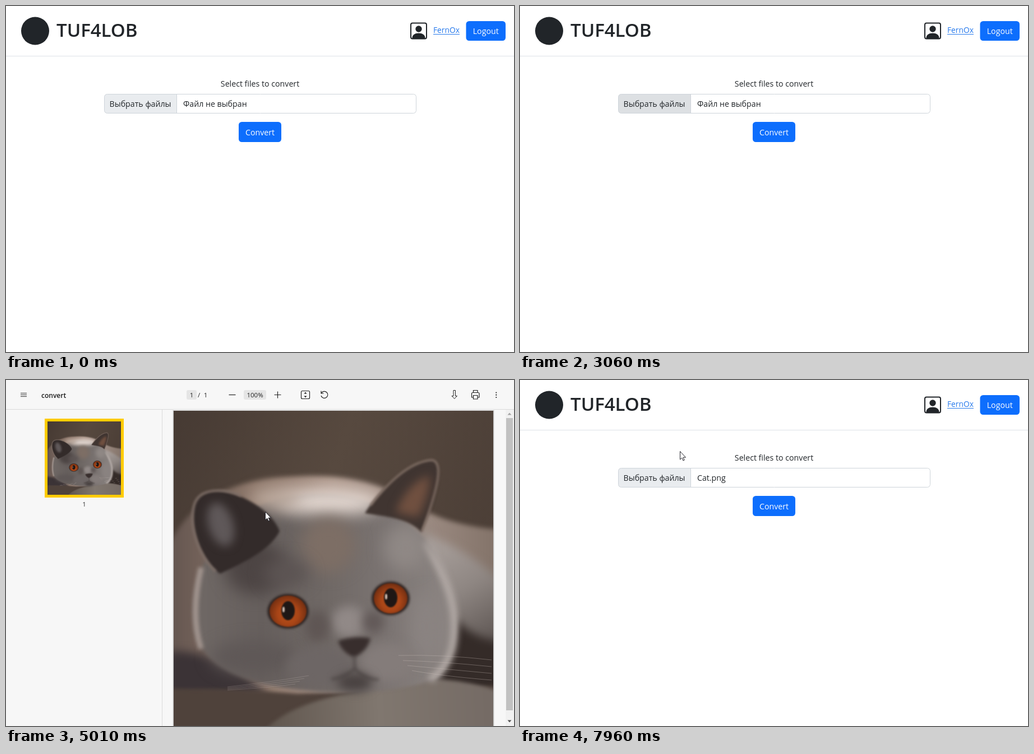
An HTML page with a canvas for the animation above (8000 ms loop, 906 px wide and 618 px high).

```html
<!DOCTYPE html>
<html lang="en">
<head>
<meta charset="utf-8">
<title>File converter</title>
<style>
html, body { margin: 0; width: 100%; height: 100%; overflow: hidden; background: #fff; }
canvas { display: block; width: 906px; height: 618px; }
</style>
</head>
<body>
<canvas id="stage" width="906" height="618"></canvas>
<script>
const LOOP = 8000, W = 906, H = 618;
const FONT = '"Open Sans", "Noto Sans", sans-serif';
const INK = '#212529', BLUE = '#0d6efd', BLUE_HOVER = '#0b5ed7';
const FIELD = { x: 175, y: 157, w: 557, h: 35 };
const CONVERT = { x: 415, y: 207, w: 76, h: 36 };
const PHOTO = { x: 299, y: 55, size: 570 };

// start, end, steps, from, to
const MOVES = [
  [250, 1010, 11, [452, 420], [402, 178]],
  [3130, 3820, 10, [520, 322], [478, 262]],
  [3890, 4290, 6, [478, 262], [463, 236]],
  [5010, 5010, 1, [462, 235], [462, 235]],
  [6080, 6400, 5, [462, 235], [71, 0]],
  [7890, 7960, 2, [71, 0], [285, 127]]
];

const stage = document.getElementById('stage');
let ctx = stage.getContext('2d');

const clamp = v => Math.max(0, Math.min(1, v));

function mix(a, b, p) {
  return 'rgb(' + a.map((v, i) => Math.round(v + (b[i] - v) * p)).join(',') + ')';
}

function text(str, x, y, size, color = INK, align = 'left', weight = 400) {
  ctx.font = `${weight} ${size}px ${FONT}`;
  ctx.textAlign = align;
  ctx.fillStyle = color;
  ctx.fillText(str, x, y);
}

function rect(x, y, w, h, color) {
  ctx.fillStyle = color;
  ctx.fillRect(x, y, w, h);
}

function roundBox(x, y, w, h, r, fill, stroke, width = 1) {
  ctx.beginPath();
  ctx.roundRect(x, y, w, h, r);
  if (fill) { ctx.fillStyle = fill; ctx.fill(); }
  if (stroke) { ctx.strokeStyle = stroke; ctx.lineWidth = width; ctx.stroke(); }
}

function ellipse(x, y, rx, ry, fill, turn = 0) {
  ctx.beginPath();
  ctx.ellipse(x, y, rx, ry, turn, 0, 7);
  ctx.fillStyle = fill;
  ctx.fill();
}

function shape(d, fill) {
  ctx.fillStyle = fill;
  ctx.fill(new Path2D(d));
}

function line(d, color = '#222', width = 1.2) {
  ctx.strokeStyle = color;
  ctx.lineWidth = width;
  ctx.stroke(new Path2D(d));
}

function radial(x, y, r, ...colors) {
  const g = ctx.createRadialGradient(x, y, 0, x, y, r);
  colors.forEach((c, i) => g.addColorStop(i / (colors.length - 1), c));
  return g;
}

function linear(x0, y0, x1, y1, ...colors) {
  const g = ctx.createLinearGradient(x0, y0, x1, y1);
  colors.forEach((c, i) => g.addColorStop(i / (colors.length - 1), c));
  return g;
}

const blur = px => { ctx.filter = `blur(${px}px)`; };

const inside = (p, b) => p.x >= b.x && p.x <= b.x + b.w && p.y >= b.y && p.y <= b.y + b.h;

function pointerAt(t) {
  let pos = null;
  for (const [start, end, steps, a, b] of MOVES) {
    if (t < start) break;
    const i = end > start ? Math.floor((t - start) / (end - start) * (steps - 1) + 1e-6) : 0;
    const p = clamp((i + 1) / steps);
    pos = { x: a[0] + (b[0] - a[0]) * p, y: a[1] + (b[1] - a[1]) * p };
  }
  return pos;
}

function drawPointer(pos, hand) {
  const d = hand
    ? 'M-1.5 1.5Q0 -1 1.5 1.5V7Q3 6 4.2 7.6Q6 6.6 7 8.4Q9.3 7.8 9.5 10.5V14Q9 18 7.5 19V21.5H-0.5V19.5Q-3.5 16 -5 12.5Q-4.6 10 -1.5 13Z'
    : 'M.5 .5V15L3.8 12L6 17L8.2 16L6 11.2H10.5Z';
  ctx.save();
  ctx.translate(Math.round(pos.x), Math.round(pos.y));
  ctx.lineJoin = 'round';
  shape(d, '#fff');
  line(d, '#25252c', 1);
  if (hand) line('M1.5 7V11M4.2 8V11M7 9V11.5', '#25252c', .8);
  ctx.restore();
}

function drawBackdrop() {
  rect(299, 55, 570, 570, linear(299, 55, 869, 260, '#463a33', '#57493f', '#4c3f37'));
  blur(4);
  shape('M285 310C312 235 380 182 490 174C590 165 670 178 745 232Q800 262 890 268V640H285Z',
    linear(300, 0, 869, 0, '#665751', '#8d776a', '#b09a8e', '#a08f86', '#84746a'));
  blur(8);
  shape('M745 275Q820 300 890 365V640H745Z', linear(740, 290, 860, 480, '#aba29e', '#8e8682', '#5b5350'));
  shape('M800 425Q835 465 890 468V560H765Z', '#342b28');
  shape('M285 485Q350 478 430 530L470 562H285Z', '#3b3336');
  blur(3);
  shape('M285 552Q420 552 520 560L890 545V640H285Z', '#4f423b');
  shape('M450 640Q490 582 610 560Q700 537 780 535Q840 540 890 560V640Z',
    linear(470, 600, 860, 580, '#61574f', '#80776f', '#756b65'));
}

function drawHead() {
  blur(3);
  shape('M336 430C330 350 360 300 420 240C480 200 590 195 650 220C715 235 755 285 785 350C815 430 805 500 765 535C690 560 600 562 540 555C450 548 335 520 336 430Z',
    linear(340, 0, 800, 0, '#6f6865', '#665f5d', '#6f6865', '#7c7573', '#8e8784'));
  line('M348 335Q328 420 348 480', '#a0938d', 10);
  blur(6);
  line('M745 290Q815 390 796 480Q785 520 755 535', '#b7aeaa', 12);
  blur(14);
  ellipse(575, 218, 95, 24, '#e2d6cf');
  ellipse(480, 212, 45, 18, '#bba99d');
  ellipse(575, 295, 48, 50, '#7d6e65');
  ellipse(445, 335, 55, 48, '#4d4544');
  ellipse(712, 300, 38, 40, '#8f8885');
  ellipse(500, 345, 40, 25, '#5c5453');
  ellipse(750, 440, 28, 60, '#8a8381');
  ellipse(440, 495, 75, 30, '#5f5857');
  blur(9);
  ellipse(612, 432, 32, 28, '#918987');
  ellipse(555, 440, 22, 28, '#5f5654');
  ellipse(655, 432, 20, 20, '#625958');
}

function drawEars() {
  blur(2);
  shape('M382 346C350 325 326 265 335 225C344 190 390 194 418 208C455 224 480 248 488 270C470 305 425 325 382 346Z', '#332b2a');
  shape('M640 238C670 190 720 145 760 143C780 147 772 190 762 220L741 272C715 245 680 245 640 238Z', '#403531');
  line('M374 342C345 315 326 265 335 225C344 190 390 194 420 207', '#83736b', 4);
  line('M650 224C680 185 720 145 760 143C780 147 772 190 742 270', '#8f7c71', 3);
  blur(8);
  ellipse(383, 258, 22, 40, '#5f5859', -.3);
  shape('M695 236Q715 185 755 170Q757 200 735 245Z', '#705040');
}

function drawEye(x, y, rx, ry) {
  blur(2);
  ellipse(x, y, rx, ry, '#2f2523');
  blur(1);
  ellipse(x, y, rx - 4, ry - 3, radial(x, y + 5, rx, '#b9531b', '#a94517', '#6b2b10'));
  ellipse(x, y - 1, 12, 17, '#1f1715');
  ellipse(x - 8, y - 3, 2, 5, '#d9c4b8');
}

function drawMuzzle() {
  blur(9);
  ellipse(560, 512, 60, 34, '#6d6665');
  ellipse(680, 504, 48, 34, '#847c7a');
  ellipse(622, 540, 32, 16, '#484140');
  blur(3);
  shape('M592 466Q620 456 650 461Q645 484 621 495Q600 488 592 466Z', '#382e2d');
  line('M621 493L622 515Q605 532 580 534M622 515Q638 535 665 535', '#453e3d', 3);
  blur(.5);
  for (let i = 0; i < 4; i++) {
    line(`M${700 + i * 8} ${492 + i * 9}Q780 ${490 + i * 13} 866 ${500 + i * 12}`, 'rgba(205,195,190,.35)', 1);
    line(`M${540 - i * 8} ${528 + i * 5}Q470 ${540 + i * 3} 395 ${548 + i * 2}`, 'rgba(205,195,190,.25)', 1);
  }
}

function makePhoto() {
  const photo = document.createElement('canvas');
  photo.width = photo.height = PHOTO.size;
  const main = ctx;
  ctx = photo.getContext('2d');
  ctx.translate(-PHOTO.x, -PHOTO.y);
  drawBackdrop();
  drawHead();
  drawEars();
  drawEye(503, 413, 37, 31);
  drawEye(686, 390, 34, 30);
  drawMuzzle();
  ctx = main;
  return photo;
}

const photo = makePhoto();

function ringLevel(t) {
  if (t >= 1080 && t < 1250) return t < 1160 ? .5 : .8;
  if (t < 3130 || t >= 5010) return 0;
  return t < 4290 ? clamp((t - 3060) / 150) : Math.max(.2, 1 - (t - 4290) / 150);
}

function drawHeader() {
  ellipse(52, 44.5, 25, 25, INK);
  text('TUF4LOB', 90, 55, 33, INK, 'left', 600);

  roundBox(722, 30.5, 28, 28, 3, '#fff', INK, 2);
  ellipse(736, 41, 5.7, 5.7, INK);
  shape('M724.5 58V56C725 52 729 48.5 736 48.5S747 52 747.5 56V58Z', INK);

  text('FernOx', 762, 48, 13.8, '#2679ec');
  rect(762, 50, 47, 1, '#2679ec');
  roundBox(820.5, 27, 70.5, 35, 5.5, BLUE);
  text('Logout', 855.7, 50, 14.2, '#fff', 'center');
  rect(0, 89, W, 1, '#dee2e6');
}

function drawField(t, hover) {
  const { x, y, w, h } = FIELD, level = ringLevel(t);
  if (level > .2) roundBox(x - 1.5, y - 1.5, w + 3, h + 3, 7, null, `rgba(13,110,253,${.25 * level})`, 4);
  const edge = mix([206, 212, 218], [134, 183, 254], level);
  roundBox(x + .5, y + .5, w - 1, h - 1, 5, '#fff');
  roundBox(x + .5, y + .5, 129, h - 1, [5, 0, 0, 5], hover ? '#dde0e3' : '#e9ecef');
  rect(304, y, 1, h, edge);
  roundBox(x + .5, y + .5, w - 1, h - 1, 5, null, edge);
  text('Выбрать файлы', 239.5, 180, 14.2, INK, 'center');
  text(t < 3130 ? 'Файл не выбран' : 'Cat.png', 316, 180, 14.2);
}

function drawForm(t, pos) {
  const overField = !!pos && inside(pos, FIELD);
  const overButton = !!pos && inside(pos, CONVERT);
  rect(0, 0, W, H, '#fff');
  drawHeader();
  text('Select files to convert', 453, 144, 14.2, INK, 'center');
  drawField(t, overField);
  roundBox(CONVERT.x, CONVERT.y, CONVERT.w, CONVERT.h, 5.5, overButton ? BLUE_HOVER : BLUE);
  text('Convert', 453, 230.5, 14.2, '#fff', 'center');
  return overField || overButton;
}

function drawToolbar() {
  line('M26 23.5H37M26 26.5H37M26 29.5H37', '#333', 1);
  text('convert', 63, 31.5, 12, '#1b1b1b', 'left', 600);
  roundBox(322, 18, 18, 17, 3, '#e5e5e5');
  text('1', 331, 31, 11.5, '#222', 'center');
  text('/', 344, 31, 11.5, '#222', 'center');
  text('1', 356, 31, 11.5, '#222', 'center');
  line('M397.5 26.5H409.5');
  roundBox(424, 18, 40, 17, 3, '#e5e5e5');
  text('100%', 444, 31, 11.5, '#222', 'center');
  line('M478.5 26.5H490.5M484.5 20.5V32.5');

  roundBox(526.5, 19.5, 15, 14, 2, null, '#222', 1.2);
  shape('M531.5 24.5L534 21.5L536.5 24.5ZM531.5 28.5L534 31.5L536.5 28.5Z', '#222');
  line('M562.5 23.5A6 6 0 1 1 562 28M562 19.5V24H566.5');

  line('M798 18.5H801.5V28.5H804.5L799.8 33.5L795 28.5H798Z', '#222', 1);
  line('M833.5 22.5V18.5H841V22.5M833.5 31H830.5V24.5Q830.5 22.5 832.5 22.5H842Q844 22.5 844 24.5V31H841M833.5 27.5H841V34H833.5Z');
  [22.5, 26.7, 31].forEach(y => ellipse(874.3, y, 1.1, 1.1, '#222'));
}

function drawViewer() {
  rect(0, 0, W, H, '#f7f7f7');
  rect(0, 52, W, 1, '#dadada');
  rect(278, 53, 1, H, '#dadada');
  drawToolbar();

  rect(69, 69, 141, 141, '#fc0');
  ctx.drawImage(photo, 74, 74, 131, 131);
  text('1', 139.5, 226, 11.5, '#333', 'center');

  rect(297, 54, 574, H, '#dedede');
  rect(298, 54, 572, H, '#c6c6c6');
  ctx.drawImage(photo, PHOTO.x, PHOTO.y);

  rect(891, 53, 15, H, '#f1f1f1');
  rect(892, 68, 12, 522, '#c1c1c1');
  shape('M894.5 62.5L898 58.5L901.5 62.5Z', '#a3a3a3');
  shape('M894.5 607.5L898 611.5L901.5 607.5Z', '#505050');
}

function render(t) {
  const pos = pointerAt(t);
  let hand = false;
  if (t >= 5010 && t < 7640) drawViewer();
  else hand = drawForm(t, pos);
  const hidden = t >= 3060 && t < 3130;
  if (pos && !hidden) drawPointer(pos, hand);
}

const began = performance.now();
function tick() {
  render((performance.now() - began) % LOOP);
  requestAnimationFrame(tick);
}
tick();
</script>
</body>
</html>
```
